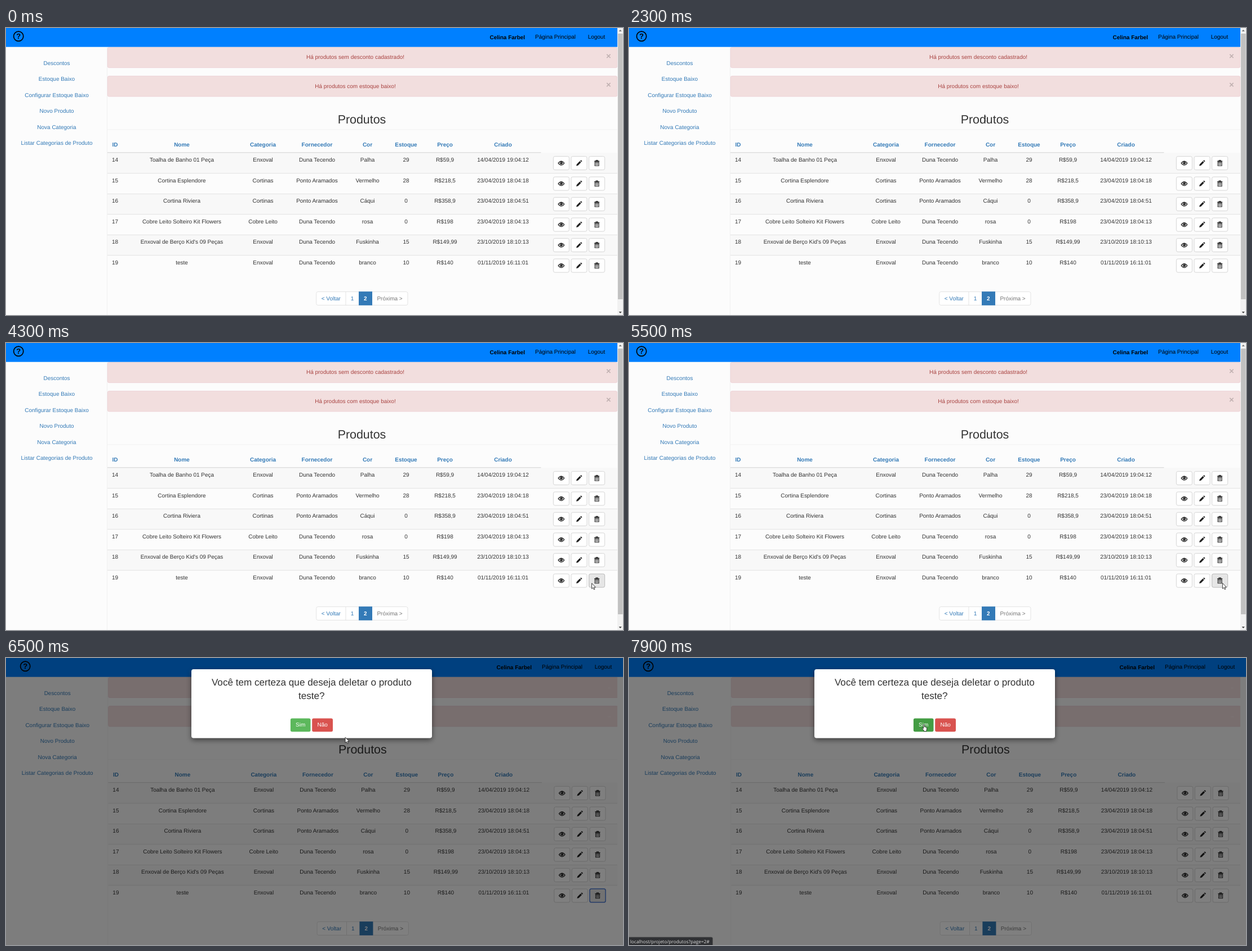
These frames come from a looping animation (1095x511 px, 8000 ms). An HTML page:

```html
<!DOCTYPE html>
<html lang="pt-BR">
<head>
<meta charset="utf-8">
<title>Produtos</title>
<style>
html, body { margin: 0; width: 100%; height: 100%; overflow: hidden; background: #fcfcfc; }
svg { display: block; width: 1095px; height: 511px; }
text { font-family: "Liberation Sans", Arial, sans-serif; font-size: 9.98px; text-rendering: geometricPrecision; white-space: pre; }
.mid { text-anchor: middle; }
.bold { font-weight: bold; }
.link { fill: #337ab7; }
.status { font-family: "Open Sans", "Noto Sans", sans-serif; font-size: 8.25px; }
</style>
</head>
<body>
<svg id="stage" viewBox="0 0 1095 511"></svg>
<script>
const LOOP = 8000, OPEN = 5600, BLUR = 7900;
const ROW = 36.5, TABLE_TOP = 222;
const stage = document.getElementById('stage');

const rect = (x, y, w, h, fill, more = '') =>
  `<rect x="${x}" y="${y}" width="${w}" height="${h}" fill="${fill}" ${more}/>`;
const text = (x, y, str, cls = '', fill = '#333', more = '') =>
  `<text x="${x}" y="${y}" class="${cls}" ${cls.includes('link') ? '' : `fill="${fill}"`} ${more}>${str}</text>`;
const group = (id, body, more = '') => `<g id="${id}" ${more}>${body}</g>`;

const links = ['Descontos', 'Estoque Baixo', 'Configurar Estoque Baixo',
  'Novo Produto', 'Nova Categoria', 'Listar Categorias de Produto'];
const columns = [['ID', 193.5], ['Nome', 312], ['Categoria', 456], ['Fornecedor', 552],
  ['Cor', 641.5], ['Estoque', 710], ['Preço', 779], ['Criado', 882]];
const products = [
  '14|Toalha de Banho 01 Peça|Enxoval|Duna Tecendo|Palha|29|R$59,9|14/04/2019 19:04:12',
  '15|Cortina Esplendore|Cortinas|Ponto Aramados|Vermelho|28|R$218,5|23/04/2019 18:04:18',
  '16|Cortina Riviera|Cortinas|Ponto Aramados|Cáqui|0|R$358,9|23/04/2019 18:04:51',
  '17|Cobre Leito Solteiro Kit Flowers|Cobre Leito|Duna Tecendo|rosa|0|R$198|23/04/2019 18:04:13',
  "18|Enxoval de Berço Kid's 09 Peças|Enxoval|Duna Tecendo|Fuskinha|15|R$149,99|23/10/2019 18:10:13",
  '19|teste|Enxoval|Duna Tecendo|branco|10|R$140|01/11/2019 16:11:01'
];

const icons = [
  `<path d="M-5.3 0Q0-7 5.3 0Q0 7-5.3 0Z" fill="none" stroke="#222" stroke-width="1.2"/>
   <circle cy="-.3" r="2.5" fill="#222"/><circle cx="-.7" cy="-1" r=".7" fill="#fff"/>`,
  `<path d="M-5 5-4.1 1.8 1.3-3.6 3.6-1.3-1.8 4.1ZM2-4.3 3-5.2Q3.5-5.5 4-5L5-4Q5.5-3.5 5.2-3L4.3-2Z" fill="#222"/>`,
  `<path d="M-4.6-3.5H4.6M-1.6-3.8V-5H1.6V-3.8" fill="none" stroke="#222" stroke-width="1.2"/>
   <path d="M-3.5-2V4.7H3.5V-2ZM-1.3-1.2V3.5M1.3-1.2V3.5" fill="none" stroke="#222" stroke-width="1.1"/>`
];
const BUTTON_X = [971.4, 1003, 1034.6];

function header() {
  return `<circle cx="22.2" cy="14.8" r="8.6" fill="none" stroke="#000" stroke-width="1.7"/>` +
    text(22.2, 19.4, '?', 'mid bold', '#000', 'style="font-size:13px"') +
    text(858.5, 19.8, 'Celina Farbel', 'bold', '#000') +
    text(939, 19, 'Página Principal', '', '#000') +
    text(1032.7, 19, 'Logout', '', '#000');
}

function alertBox(y, message) {
  return rect(180.3, y + .4, 904.4, 36.4, '#f2dede', 'rx="2.5" stroke="#ebccd1" stroke-width=".7"') +
    `<g class="alertText">${text(620, y + 21.5, message, 'mid', '#a94442')}` +
    text(1069.5, y + 21, '×', 'mid bold', '#000', 'style="font-size:15px" opacity=".2"') + '</g>' +
    `<path class="closeDots" d="M1067 ${y + 19.5}h5" stroke="#fff" opacity=".5" stroke-dasharray="1.3 .8"/>`;
}

function actions(row) {
  const y = 228.6 + row * ROW;
  return BUTTON_X.map((x, i) =>
    rect(x, y, 28, 24, '#fff', `rx="2.8" stroke="#ccc" stroke-width=".8" ${row === 5 ? `id="act${i}"` : ''}`) +
    `<g transform="translate(${x + 14} ${y + 12})">${icons[i]}</g>`).join('');
}

function table() {
  let out = columns.map(([name, x]) => text(x, 211.2, name, 'mid bold link')).join('');
  products.forEach((line, r) => {
    const y = TABLE_TOP + r * ROW;
    if (r % 2 === 0) out += rect(180, y, 905, ROW, '#f8f8f8');
    if (r) out += rect(180, y - .1, 905, .8, '#ddd');
    out += line.split('|').map((cell, c) => text(columns[c][1], y + 16.1, cell, 'mid')).join('');
    out += actions(r);
  });
  return out + rect(180, 221, 769.5, 1.4, '#ddd');
}

function pager() {
  return rect(550.7, 469.6, 162.2, 23.9, '#fff', 'rx="2.8" stroke="#ddd" stroke-width=".8"') +
    rect(602.6, 469.6, .8, 23.9, '#ddd') + rect(626, 469.2, 24, 24.6, '#337ab7') +
    text(576.8, 484.8, '&lt; Voltar', 'mid link') + text(614.5, 484.8, '1', 'mid link') +
    text(637.8, 484.8, '2', 'mid bold', '#fff') + text(681, 484.8, 'Próxima &gt;', 'mid', '#777');
}

function scrollbar() {
  return rect(1085, 0, 10, 511, '#f1f1f1') + rect(1086, 10, 8.5, 473, '#c1c1c1') +
    '<path d="M1087.6 6 1090.2 3 1092.8 6Z" fill="#777"/><path d="M1087.6 505 1090.2 508 1092.8 505Z" fill="#444"/>';
}

function dialog() {
  const title = 'style="font-size:17.11px"';
  return rect(0, 0, 1095, 511, '#000', 'opacity=".5"') +
    rect(329, 20, 427, 122.5, '#fff', 'rx="4" filter="url(#shadow)"') +
    text(542.3, 48.6, 'Você tem certeza que deseja deletar o produto', 'mid', '#333', title) +
    text(542.3, 72.6, 'teste?', 'mid', '#333', title) +
    rect(504.9, 107.5, 35.6, 23.8, '#5cb85c', 'rx="2.8" id="yes"') +
    rect(543.2, 107.5, 36.8, 23.8, '#d9534f', 'rx="2.8"') +
    text(522.7, 122.3, 'Sim', 'mid', '#fff') + text(561.6, 122.3, 'Não', 'mid', '#fff') +
    group('status', rect(-3, 497, 151.5, 17, '#303134', 'rx="2.5" stroke="#555" stroke-width=".7"') +
      text(2, 507.6, 'localhost/projeto/produtos?page=2#', 'status', '#ddd'));
}

const pointers = {
  arrow: `<path d="M.4.6V10.4L2.7 8.4 4.2 11.9 5.8 11.2 4.3 7.8H7.3Z" fill="#fff" stroke="#111" stroke-width=".8"/>`,
  beam: `<path d="M0 .4H1.5M2.5.4H4M2 .8V8.2M0 8.6H1.5M2.5 8.6H4" fill="none" stroke="#222" stroke-width=".7"/>`,
  hand: `<path d="M2 7.6V1.4A.9.9 0 0 1 3.8 1.4V4.8Q4.6 4 5.3 5Q6.2 4.4 6.7 5.4Q7.9 5 8 6.4V9Q8 10.5 7.3 11.3V12.6H2.9V11.3L.2 8.1Q-.6 7 .4 6.7Q1.1 6.6 2 7.6Z" fill="#fff" stroke="#111" stroke-width=".8"/>`
};

stage.innerHTML =
  `<defs><clipPath id="content"><path d="M0 0H1085V511H0Z"/></clipPath>
   <filter id="shadow" x="-20%" y="-40%" width="140%" height="180%">
   <feDropShadow dx="0" dy="3.5" stdDeviation="5" flood-color="#000" flood-opacity=".5"/></filter></defs>` +
  rect(0, 0, 1095, 511, '#fcfcfc') +
  group('side', links.map((s, i) => text(90, 65.6 + 28.5 * i, s, 'mid link')).join('') +
    rect(179.2, 34, .8, 477, '#eee')) +
  `<g clip-path="url(#content)">` + group('main',
    alertBox(33.9, 'Há produtos sem desconto cadastrado!') +
    alertBox(85.2, 'Há produtos com estoque baixo!') +
    text(631.5, 169.5, 'Produtos', 'mid', '#333', 'style="font-size:21.4px"') +
    rect(180, 180.6, 905, .8, '#eee') + table() + pager()) + '</g>' +
  rect(0, 0, 1095, 33.7, '#0080ff') + group('head', header()) +
  group('scroll', scrollbar()) + group('dialog', dialog()) +
  group('cursor', Object.entries(pointers).map(([id, shape]) => group(id, shape)).join(''));

const el = id => document.getElementById(id);
const show = (node, on) => node.setAttribute('visibility', on ? 'visible' : 'hidden');
const shift = (id, x, y = 0) => el(id).setAttribute('transform', `translate(${x} ${y})`);

// Pointer moves: first step, last step, end x, end y
const moves = [
  [600, 800, 105, 190], [1100, 1300, 648, 58], [1500, 1800, 642, 116],
  [2100, 2300, 630, 157], [2700, 2900, 687, 367], [3100, 3300, 922, 428],
  [3600, 3700, 970, 428], [3900, 4400, 1053, 427], [5900, 6200, 719, 238],
  [6400, 6600, 543, 92], [6800, 7100, 520.5, 129], [7200, 7200, 520.5, 132], [7400, 7400, 520.5, 118]
];

function pointerAt(t) {
  let x = 90, y = -95;
  for (const [start, end, toX, toY] of moves) {
    if (t < start) break;
    const k = Math.min(1, (t - start + 100) / (end - start + 100));
    x += (toX - x) * k;
    y += (toY - y) * k;
  }
  return [x, y];
}

function draw(time) {
  const t = Math.floor(time / 100) * 100;
  const open = t >= OPEN, onYes = t >= 6900;
  const [x, y] = pointerAt(t);

  shift('head', open ? 12 : 0);
  shift('side', open ? 1.2 : 0);
  shift('main', open ? 1.4 : 0);
  show(el('scroll'), !open);
  show(el('dialog'), open);
  show(el('status'), onYes);
  el('yes').setAttribute('fill', onYes ? '#449d44' : '#5cb85c');
  stage.querySelectorAll('.alertText').forEach(n => show(n, !open));
  stage.querySelectorAll('.closeDots').forEach(n => show(n, open));

  BUTTON_X.forEach((left, i) => {
    const hover = !open && x >= left && x <= left + 28 && y > 411 && y < 435;
    const focus = i === 2 && open && t < BLUR;
    const b = el('act' + i);
    b.setAttribute('fill', hover || focus ? '#e6e6e6' : '#fff');
    b.setAttribute('stroke', focus ? '#4a78d0' : hover ? '#adadad' : '#ccc');
    b.setAttribute('stroke-width', focus ? 1.5 : .8);
  });

  shift('cursor', x, y);
  const kind = onYes ? 'hand' : t >= 2300 && t < 2700 ? 'beam' : 'arrow';
  for (const id in pointers) show(el(id), id === kind);
}

const begin = performance.now();
function tick() {
  draw((performance.now() - begin) % LOOP);
  requestAnimationFrame(tick);
}
tick();
</script>
</body>
</html>
```
